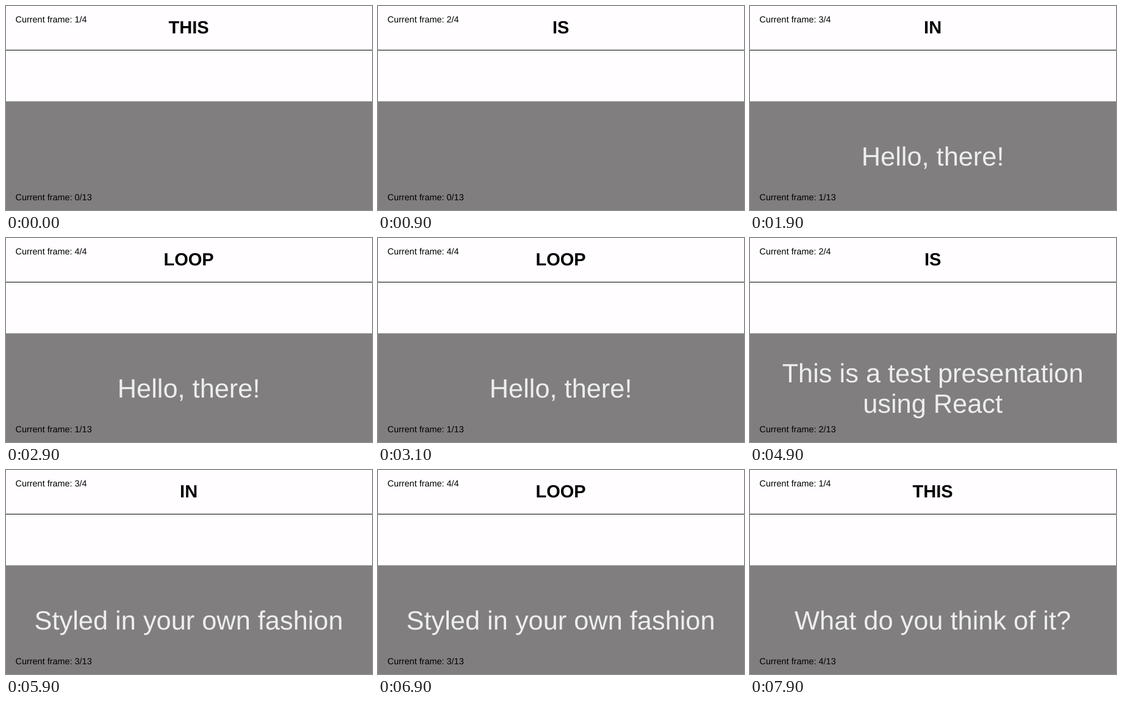
An HTML page that plays this animation: 600 by 335 pixels, repeating every 8 s.

```html
<!DOCTYPE html>
<html lang="en">
<head>
<meta charset="utf-8">
<title>Two looping slideshows</title>
<style>
  html, body { margin: 0; width: 100%; height: 100%; overflow: hidden; background: #fffdff; }
  svg { display: block; width: 600px; height: 335px; font-family: "Liberation Sans", Arial, sans-serif; }
  .counter { font-size: 14.45px; }
  .word { font-size: 29px; font-weight: bold; text-anchor: middle; }
  .slide { font-size: 43.35px; fill: #eee; text-anchor: middle; }
</style>
</head>
<body>
<svg viewBox="0 0 600 335" text-rendering="geometricPrecision">
  <rect width="600" height="335" fill="#fffdff"/>
  <rect y="72" width="600" height="1"/>
  <rect y="156.5" width="600" height="178.5" fill="#807e7f"/>
  <text id="topCount" class="counter" x="15.5" y="27"></text>
  <text id="word" class="word" x="299.6" y="45"></text>
  <text id="line1" class="slide" x="299.6"></text>
  <text id="line2" class="slide" x="299.6"></text>
  <text id="bottomCount" class="counter" x="15.5" y="319"></text>
</svg>
<script>
  const LOOP = 8000, OFFSET = 100, WORD_MS = 1000, SLIDE_MS = 2000;
  const MIDDLE = 262, LINE_HEIGHT = 50;
  const words = ["THIS", "IS", "IN", "LOOP"];
  const slides = [
    [],
    ["Hello, there!"],
    ["This is a test presentation", "using React"],
    ["Styled in your own fashion"],
    ["What do you think of it?"]
  ];
  const el = id => document.getElementById(id);
  const lines = [el("line1"), el("line2")];

  function setText(node, text) {
    if (node.textContent !== text) node.textContent = text;
  }

  function draw(time) {
    const t = time % LOOP + OFFSET;
    const w = Math.floor(t / WORD_MS) % words.length;
    const s = Math.floor(t / SLIDE_MS);
    const slide = slides[s];
    setText(el("word"), words[w]);
    setText(el("topCount"), `Current frame: ${w + 1}/4`);
    setText(el("bottomCount"), `Current frame: ${s}/13`);
    lines.forEach((line, i) => {
      line.setAttribute("y", MIDDLE + (i - (slide.length - 1) / 2) * LINE_HEIGHT);
      setText(line, slide[i] || "");
    });
  }

  const start = performance.now();
  function tick() {
    draw(performance.now() - start);
    requestAnimationFrame(tick);
  }
  tick();
</script>
</body>
</html>
```
